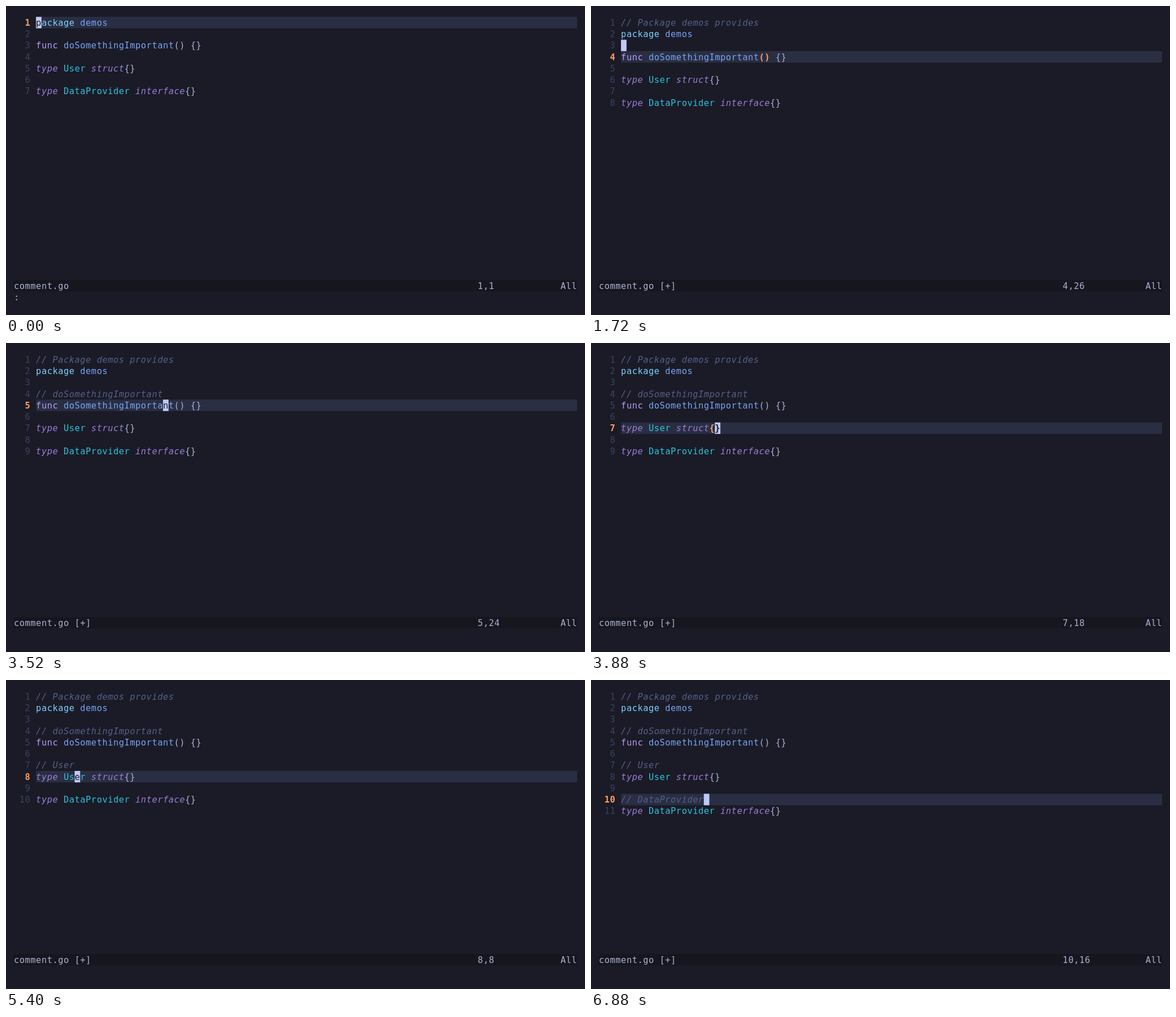
These frames come from a looping animation (1025x547 px, 9720 ms). An HTML page with a canvas:

```html
<!DOCTYPE html>
<html lang="en">
<head>
<meta charset="utf-8">
<title>Editor session</title>
<style>
html, body { margin: 0; height: 100%; overflow: hidden; background: #1a1b26; }
canvas { display: block; }
</style>
</head>
<body>
<canvas id="screen" width="1025" height="547"></canvas>
<script>
const ctx = document.getElementById('screen').getContext('2d');
const LOOP = 9720;
const LEFT = 14, TOP = 19.2, CELL_W = 9.775, CELL_H = 20.25, BASELINE = 15.7;
const COLS = 102, GUTTER = 4, STATUS_ROW = 23, CMD_ROW = 24;
const FONT = '15.4px "DejaVu Sans Mono", monospace';

const BG = '#1a1b26', TEXT = '#a9b1d6', CURSOR = '#c0caf5', ORANGE = '#ff9e64';
const BLUE = '#7aa2f7', TEAL = '#2ac3de', VIOLET = '#9d7cd8';
const STYLES = {
  package: ['#7dcfff'], demos: [BLUE], func: ['#bb9af7'], doSomethingImportant: [BLUE],
  type: [VIOLET, 'italic'], struct: [VIOLET, 'italic'], interface: [VIOLET, 'italic'],
  User: [TEAL], DataProvider: [TEAL]
};

const CODE = ['package demos', '', 'func doSomethingImportant() {}', '',
  'type User struct{}', '', 'type DataProvider interface{}'];
const COMMENTS = ['// Package demos provides ', '// doSomethingImportant ', '// User ', '// DataProvider '];
const COMMAND = ':GoCmt';

// Timeline: each step is a full editor state starting at time t.
const steps = [];
let state = { comments: 0, row: 1, col: 1, cmd: ':', cursor: [GUTTER, 0], bar: false };

function at(t, change) {
  state = { ...state, ...change };
  steps.push({ t, ...state });
}

// The cursor block may arrive later than the rest of the redraw.
function move(t, row, col, cursorTime = t) {
  at(t, { row, col });
  at(cursorTime, { cursor: [GUTTER + col - 1, row - 1], bar: false });
}

function typeCommand(...times) {
  times.forEach((t, i) => at(t, { cmd: COMMAND.slice(0, i + 1), cursor: [i + 1, CMD_ROW] }));
}

function insertComment(t) {
  const col = COMMENTS[state.comments].length + 1;
  at(t, { comments: state.comments + 1, col, cmd: '-- INSERT --',
    cursor: [GUTTER + col - 1, state.row - 1], bar: true });
}

function escape(t, cursorTime) {
  at(t, { cmd: '' });
  move(t, state.row, state.col - 1, cursorTime);
}

at(0, {});
typeCommand(40, 120, 240, 320, 440, 520);
insertComment(680);
escape(960);
move(1360, 2, 13, 1400);
move(1560, 3, 1);
move(1720, 4, 26, 1760);
typeCommand(1920, 2040, 2200, 2320, 2440, 2600);
insertComment(2720);
escape(3080);
move(3520, 5, 24);
move(3680, 6, 1, 3720);
move(3880, 7, 18);
typeCommand(4080, 4240, 4360, 4440, 4560, 4640);
at(4720, { cursor: [0, CMD_ROW] });
insertComment(4760);
escape(5040);
move(5400, 8, 8);
move(5560, 9, 1);
move(5720, 10, 8, 5760);
typeCommand(5920, 6040, 6120, 6240, 6320, 6440);
at(6560, { cursor: [0, CMD_ROW] });
insertComment(6600);
escape(6840, 6880);

const cellX = x => LEFT + x * CELL_W;
const cellY = y => TOP + y * CELL_H;

function fillCells(x, y, count, color) {
  ctx.fillStyle = color;
  ctx.fillRect(cellX(x), cellY(y), count * CELL_W, CELL_H);
}

function draw(s) {
  const [cursorX, cursorY] = s.cursor;

  function put(x, y, text, color = TEXT, style = '') {
    ctx.font = `${style} ${FONT}`;
    [...text].forEach((char, i) => {
      const covered = !s.bar && y === cursorY && x + i === cursorX;
      ctx.fillStyle = covered ? BG : color;
      ctx.fillText(char, cellX(x + i), cellY(y) + BASELINE);
    });
  }

  function putCode(line, y, active) {
    if (line.startsWith('//')) return put(GUTTER, y, line, '#565f89', 'italic');
    const under = line[s.col - 1];
    const pair = !active ? -9 : '({'.includes(under) ? s.col - 1 : ')}'.includes(under) ? s.col - 2 : -9;
    for (const { 0: token, index } of line.matchAll(/\w+|\S/g)) {
      const matched = index === pair || index === pair + 1;
      put(GUTTER + index, y, token, ...(matched ? [ORANGE, 'bold'] : STYLES[token] || [TEXT]));
    }
  }

  const lines = CODE.flatMap((line, i) =>
    i % 2 === 0 && i / 2 < s.comments ? [COMMENTS[i / 2], line] : [line]);

  ctx.fillStyle = BG;
  ctx.fillRect(0, 0, 1025, 547);
  fillCells(GUTTER, s.row - 1, COLS - GUTTER, '#292e42');
  fillCells(0, STATUS_ROW, COLS, '#16161e');
  fillCells(cursorX, cursorY, s.bar ? 0.1 : 1, CURSOR);

  lines.forEach((line, y) => {
    const active = y === s.row - 1;
    put(0, y, String(y + 1).padStart(3), ...(active ? [ORANGE, 'bold'] : ['#3b4261']));
    if (line) putCode(line, y, active);
  });

  put(0, STATUS_ROW, 'comment.go' + (s.comments ? ' [+]' : ''));
  put(84, STATUS_ROW, `${s.row},${lines[s.row - 1] ? s.col : '0-1'}`);
  put(99, STATUS_ROW, 'All');
  put(0, CMD_ROW, s.cmd, TEXT, s.cmd.startsWith('--') ? 'bold' : '');
}

function frame() {
  const t = performance.now() % LOOP;
  draw(steps.findLast(step => step.t <= t));
  requestAnimationFrame(frame);
}
frame();
</script>
</body>
</html>
```
